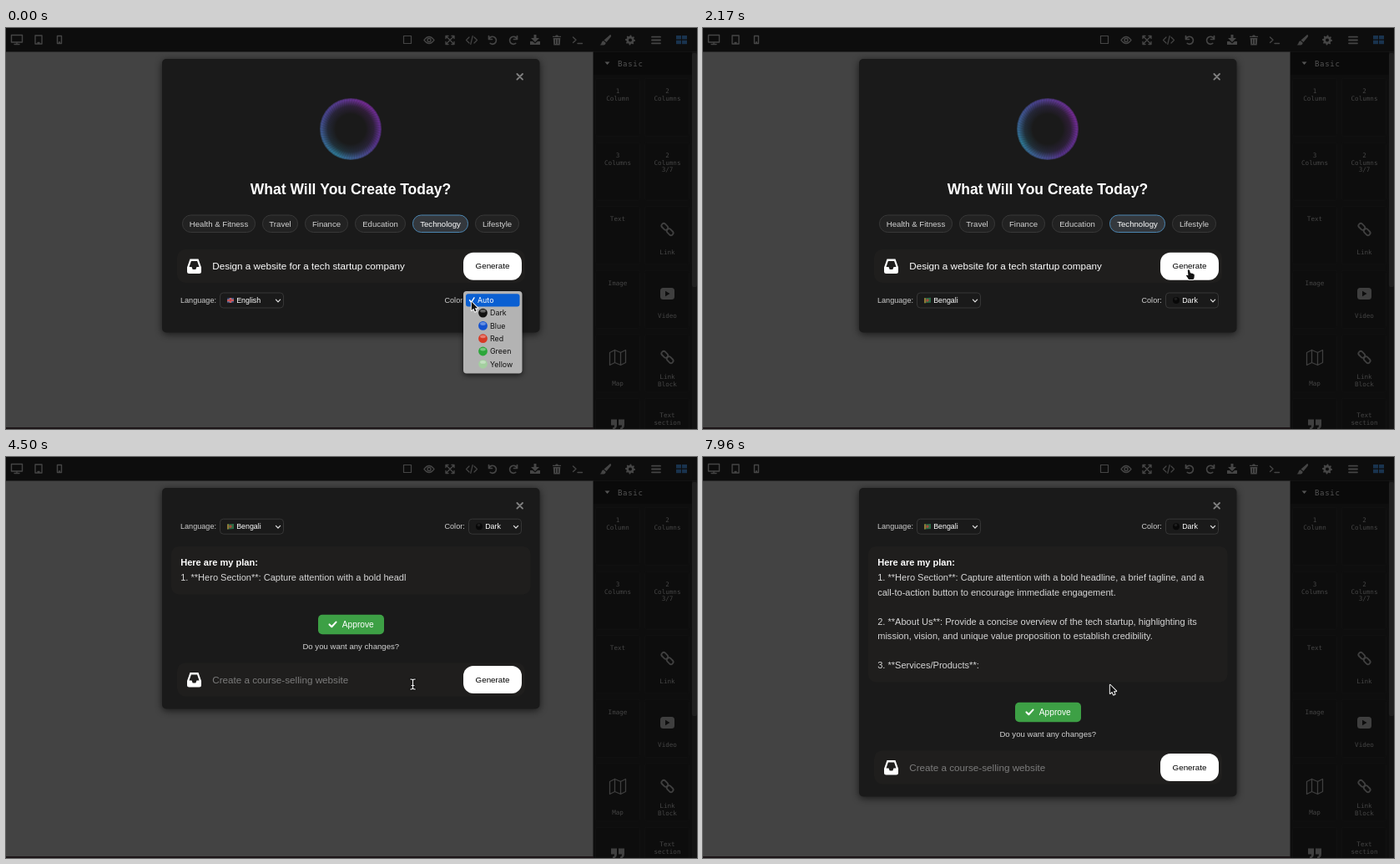
An HTML page with a canvas that plays this animation: 828 by 480 pixels, repeating every 8000 ms.

```html
<!DOCTYPE html>
<html lang="en">
<head>
<meta charset="utf-8">
<title>Website builder</title>
<style>
html, body { margin: 0; width: 100%; height: 100%; overflow: hidden; background: #434343; }
canvas { display: block; }
</style>
</head>
<body>
<canvas id="stage" width="828" height="480"></canvas>
<script>
const ctx = document.getElementById('stage').getContext('2d');
const SANS = '"Liberation Sans", Arial, sans-serif';
const MONO = '"DejaVu Sans Mono", monospace';
const MENU = 'Inter, sans-serif';
const LOOP = 8000;
const MODAL = '#1a1a1a';

const COLOR_PICKED = 450, LANG_OPEN = 1060, LANG_PICKED = 1730, GENERATE = 2400, PLAN = 3770;

const PLAN_TEXT = [
  '1. **Hero Section**: Capture attention with a bold headline, a brief tagline, and a',
  'call-to-action button to encourage immediate engagement.',
  '',
  '2. **About Us**: Provide a concise overview of the tech startup, highlighting its',
  'mission, vision, and unique value proposition to establish credibility.',
  '',
  '3. **Services/Products**:'
].join('\n');

// [time, characters shown]
const TYPING = [[PLAN, 0], [5380, 123], [5835, 154], [6750, 228], [7960, 322]];
// [time, x, y] of the pointer tip
const POINTER = [
  [0, 557, 327], [150, 557, 327], [330, 566, 342], [480, 566, 342], [860, 310, 320],
  [1200, 310, 320], [1400, 306, 341], [1760, 306, 341], [2110, 582, 289],
  [2580, 582, 289], [3000, 487, 272], [8000, 487, 272]
];

function interpolate(keys, t, ease = u => u) {
  let i = 1;
  while (i < keys.length - 1 && keys[i][0] < t) i++;
  const [a, b] = [keys[i - 1], keys[i]];
  const u = ease(Math.min(1, Math.max(0, (t - a[0]) / (b[0] - a[0]))));
  return a.slice(1).map((v, k) => v + (b[k + 1] - v) * u);
}
const smooth = u => u * u * (3 - 2 * u);

// y is the middle of the capital letters
function text(str, x, y, size, color, { font = SANS, weight = 400, align = 'left', spacing = 0 } = {}) {
  ctx.font = `${weight} ${size}px ${font}`;
  ctx.letterSpacing = spacing + 'px';
  ctx.textAlign = align;
  ctx.fillStyle = color;
  ctx.fillText(str, x, y + size * 0.36);
}

function box(x, y, w, h, r, fill, border) {
  ctx.beginPath();
  ctx.roundRect(x, y, w, h, r);
  if (fill) { ctx.fillStyle = fill; ctx.fill(); }
  if (border) { ctx.strokeStyle = border; ctx.lineWidth = 1; ctx.stroke(); }
}

function circle(x, y, r, fill) {
  ctx.beginPath();
  ctx.arc(x, y, r, 0, 7);
  ctx.fillStyle = fill;
  ctx.fill();
}

function icon(d, x, y, { fill, stroke, width = 1.4 } = {}) {
  const path = new Path2D(d);
  ctx.save();
  ctx.translate(x, y);
  ctx.lineJoin = ctx.lineCap = 'round';
  if (stroke) { ctx.strokeStyle = stroke; ctx.lineWidth = width; ctx.stroke(path); }
  if (fill) { ctx.fillStyle = fill; ctx.fill(path, 'evenodd'); }
  ctx.restore();
}

function shadowed(blur, offset, draw) {
  ctx.save();
  ctx.shadowColor = 'rgba(0,0,0,.65)';
  ctx.shadowBlur = blur;
  ctx.shadowOffsetY = offset;
  draw();
  ctx.restore();
}

function toolbar() {
  const gray = '#454545', line = { stroke: gray }, solid = { fill: gray };
  ctx.fillStyle = '#0d0d0d';
  ctx.fillRect(0, 0, 828, 28.5);
  icon('M-6.5-5.5h13v8.5h-13zM-3 5.5h6M0 3v2', 13, 14, line);
  icon('M-4-5h8v10h-8zM-1 3.5h2', 39, 14, line);
  icon('M-2.5-4.5h5v9h-5zM-.5 3h1', 64, 14, line);
  icon('M-4.5-4.5h9v9h-9z', 481, 14, { stroke: gray, width: 1.2 });
  icon('M-6 0Q0-8 6 0Q0 8-6 0zM-2 0a2 2 0 1 0 4 0a2 2 0 1 0-4 0', 507, 14.5, line);
  icon('M-5-2v-3h3M2-5h3v3M5 2v3h-3M-2 5h-3v-3M-5-5l10 10M5-5l-10 10', 532, 14.5, line);
  icon('M-3-3.5l-3.5 3.5l3.5 3.5M3-3.5l3.5 3.5l-3.5 3.5M1.2-5l-2.4 10', 558, 14.5, { stroke: gray, width: 1.2 });
  const turn = 'M-4.5-5v4h4M-4.3-1.2A4.5 4.5 0 1 1-2.7 3.9';
  icon(turn, 583, 14.5, { stroke: gray, width: 1.7 });
  ctx.save();
  ctx.translate(608, 14.5);
  ctx.scale(-1, 1);
  icon(turn, 0, 0, { stroke: gray, width: 1.7 });
  ctx.restore();
  icon('M-1.5-6h3v4h3.5l-5 5l-5-5h3.5zM-6 2h3l3 2.5l3-2.5h3v4h-12z', 634, 14, solid);
  icon('M-5-4.8h3l1-1.2h2l1 1.2h3v1.4h-10zM-4.3-2.5h8.6l-.6 8.5h-7.4zM-2-1v5.5h.8v-5.5zM1.2-1v5.5h.8v-5.5z', 660, 14.5, solid);
  icon('M-5.5-3.5l3.5 3.2l-3.5 3.2M0 4h5.5', 685, 14.5, line);
  icon('M6-6.5Q8-6 6.5-3.5L1.5 2.5L-1.5 0zM-2 .8l2.7 2.4Q.5 7-6.5 5.8Q-4.5 5-4.3 3Q-4 1-2 .8z', 718, 14.5, solid);
  let gear = '';
  for (let i = 0; i < 32; i++) {
    const a = i * Math.PI / 16, r = i % 4 < 2 ? 6 : 4.5;
    gear += `${i ? 'L' : 'M'}${r * Math.cos(a)} ${r * Math.sin(a)}`;
  }
  icon(gear + 'zM-2 0a2 2 0 1 0 4 0a2 2 0 1 0-4 0', 748, 14.5, solid);
  icon('M-5-3.8h10M-5 0h10M-5 3.8h10', 779, 14.5, { stroke: gray, width: 1.8 });
  icon('M-6.5-5h6v4.5h-6zM.5-5h6v4.5h-6zM-6.5.8h6v4.5h-6zM.5.8h6v4.5h-6z', 809.5, 14, { fill: '#19334e' });
}

function sidePanel() {
  const gray = '#3f3f3f';
  const label = (lines, x, y) => lines.split('|').forEach((s, i) =>
    text(s, x, y + i * 8.8, 7.6, '#454545', { font: MONO, align: 'center' }));
  ctx.fillStyle = '#0e0e0e';
  ctx.fillRect(703.5, 28.5, 124.5, 451.5);
  ctx.fillStyle = '#0a0a0a';
  ctx.fillRect(704, 28.5, 118, 27.5);
  icon('M-3-1.5h6l-3 3.5z', 720.5, 42, { fill: '#545454' });
  text('Basic', 733, 42.5, 9, '#545454', { font: MONO, spacing: 0.7 });
  for (let row = 0; row < 6; row++) {
    box(706.5, 60.5 + row * 76.6, 53, 69, 2, '#0d0d0d', '#111');
    box(765.5, 60.5 + row * 76.6, 53, 69, 2, '#0d0d0d', '#111');
  }
  ctx.fillStyle = '#131313';
  ctx.fillRect(822, 28.5, 6, 451.5);
  box(822, 30, 6, 280, 2, '#202020');

  label('1|Column', 733, 75.5);
  label('2|Columns', 792.5, 75.5);
  label('3|Columns', 733, 152);
  label('2|Columns|3/7', 792.5, 152);
  label('Text', 733, 228.5);
  label('Link', 792.5, 268);
  label('Image', 733, 305);
  label('Video', 792.5, 344.5);
  label('Map', 733, 425.5);
  label('Link|Block', 792.5, 417);
  label('Text|section', 792.5, 463);

  for (const y of [241, 394]) {
    for (const s of [-3.2, 3.2]) {
      ctx.save();
      ctx.translate(792.5 + s, y + s);
      ctx.rotate(Math.PI / 4);
      ctx.lineWidth = 1.8;
      ctx.strokeStyle = gray;
      ctx.beginPath();
      ctx.roundRect(-4.3, -2.7, 8.6, 5.4, 2.6);
      ctx.stroke();
      ctx.restore();
    }
  }
  box(784, 311, 17, 14, 3.5, gray);
  icon('M-2-3.2l5.5 3.2l-5.5 3.2z', 792, 318, { fill: '#0d0d0d' });
  icon('M-9.5-6l6-3l7 3l6-3v15l-6 3l-7-3l-6 3zM-3.5-9v15M3.5-6v15', 733, 394.5, { stroke: gray, width: 1.3 });
  icon('M-8-6h7v7q0 5-5 5v-2q2 0 2-3h-4zM1-6h7v7q0 5-5 5v-2q2 0 2-3h-4z', 733, 474.5, { fill: gray });
}

function backdrop() {
  ctx.fillStyle = '#434343';
  ctx.fillRect(0, 0, 828, 480);
  toolbar();
  sidePanel();
  ctx.fillStyle = '#1c1517';
  ctx.fillRect(0, 478, 704, 2);
}

function modal(bottom) {
  shadowed(10, 2, () => box(187, 37, 452.5, bottom - 37, 5, MODAL));
  icon('M-3.3-3.3l6.6 6.6M3.3-3.3l-6.6 6.6', 615.7, 58.3, { stroke: '#808080', width: 1.9 });
}

function orb(t) {
  const x = 413, y = 121, r = 37;
  const sweep = ctx.createConicGradient(-Math.PI / 3 + t / 2000 * 2 * Math.PI, x, y);
  ['#7a2b9b', '#5a3492', '#2f7f9e', '#4a4795', '#7a2b9b'].forEach((c, i) => sweep.addColorStop(i / 4, c));
  circle(x, y, r, sweep);
  ctx.strokeStyle = 'rgba(26,26,26,.2)';
  ctx.lineWidth = 0.8;
  ctx.beginPath();
  for (let i = 0; i < 72; i++) {
    const a = i * Math.PI / 36;
    ctx.moveTo(x + 22 * Math.cos(a), y + 22 * Math.sin(a));
    ctx.lineTo(x + r * Math.cos(a + 0.15), y + r * Math.sin(a + 0.15));
  }
  ctx.stroke();
  const core = ctx.createRadialGradient(x, y, 18, x, y, r);
  core.addColorStop(0, MODAL);
  core.addColorStop(0.5, 'rgba(26,26,26,.75)');
  core.addColorStop(0.9, 'rgba(26,26,26,.05)');
  core.addColorStop(1, 'rgba(26,26,26,.5)');
  circle(x, y, r + 0.5, core);
}

function flag(language, x, y) {
  ctx.save();
  ctx.translate(x, y);
  ctx.transform(1, -0.08, 0, 1, 0, 0);
  const bar = (c, ...r) => { ctx.fillStyle = c; ctx.fillRect(...r); };
  if (language === 'English') {
    bar('#39446e', -4, -3, 8, 6);
    bar('#c9b9b9', -4, -1.2, 8, 2.4);
    bar('#c9b9b9', -1.2, -3, 2.4, 6);
    bar('#c23a42', -4, -0.7, 8, 1.4);
    bar('#c23a42', -0.7, -3, 1.4, 6);
  } else if (language === 'Bengali') {
    bar('#2c6b45', -4, -3, 8, 6);
    bar('#8d7a35', -4, -3, 2, 6);
    circle(0, 0, 1.7, '#a8483a');
  } else {
    const hues = { Hindi: 28, Spanish: 45, French: 225, German: 0 };
    bar(`hsl(${hues[language]} 70% 45%)`, -4, -3, 8, 2);
    bar('#ddd', -4, -1, 8, 2);
    bar(`hsl(${hues[language] + 100} 50% 35%)`, -4, 1, 8, 2);
  }
  ctx.restore();
}

function select(x, y, w, label, value, labelX, focused) {
  text(label, labelX, y - 0.3, 9.1, '#cfcfcf');
  box(x + 0.5, y - 9, w - 1, 18, 4, MODAL, focused ? '#4b87b4' : '#363636');
  const chevron = x + w - 7;
  icon('M-2.6-1.3l2.6 2.6l2.6-2.6', chevron, y + 0.5, { stroke: '#e0e0e0', width: 1.2 });
  text(value, x + 20.2, y - 0.3, 8.85, '#fff');
}

function selects(y, language, focused) {
  select(256, y, 77, 'Language:', language, 209, focused);
  flag(language, 269, y);
  select(554, y, 64, 'Color:', 'Dark', 525.5);
  circle(567, y, 4, '#080808');
  circle(566.5, y - 1.7, 1.8, '#1d1d1d');
}

function promptRow(y, value, color) {
  box(205, y - 20, 417, 40, 10, '#1f1e1d');
  icon('M-8.5 1.5L-5-8.5H5L8.5 1.5V6.5Q8.5 9 6 9H-6Q-8.5 9-8.5 6.5zM-6 1L-3.6-6H3.6L6 1H3L1.8 4H-1.8L-3 1z',
    225.5, y, { fill: '#fff' });
  text(value, 247.2, y, 11.7, color);
  box(548, y - 16.3, 70, 33, 12, '#fff');
  text('Generate', 583, y - 0.3, 9.8, '#000', { align: 'center' });
}

// Native-style popup with the first entry checked
function popup(x, items, tipY, mark, offset) {
  shadowed(6, 2, () => box(x, 315, 70.5, 98.5, 4, '#b3b3b3'));
  const hovered = Math.max(0, Math.min(items.length - 1, Math.floor((tipY - 318) / 15.3)));
  items.forEach((item, i) => {
    const y = 325.8 + i * 15.3;
    if (i === hovered) box(x + 3, y - 7.6, 64.5, 15.3, 3, '#0a5fd2');
    const color = i === hovered ? '#fff' : '#111';
    if (i === 0) icon('M-2.5 0l2 2.5l3.5-5.5', x + 10, y, { stroke: color, width: 1.4 });
    const marked = mark(i, x + 23.5, y);
    text(item, x + (marked ? 32 : offset), y, 8.9, color, { font: MENU });
  });
}

function ball(i, x, y) {
  if (!i) return false;
  const color = ['', '#111', '#1452cf', '#d63a26', '#2ca63a', '#a3cf9f'][i];
  circle(x, y, 5.4, color);
  ctx.beginPath();
  ctx.ellipse(x, y - 2.4, 3.4, 1.9, 0, 0, 7);
  ctx.fillStyle = 'rgba(255,255,255,.35)';
  ctx.fill();
  return true;
}

function startScreen(t, tip) {
  modal(364.5);
  orb(t);
  text('What Will You Create Today?', 413, 193, 17.5, '#fff', { weight: 700, align: 'center' });
  const chips = [['Health & Fitness', 211, 299], ['Travel', 307, 350], ['Finance', 358, 410],
    ['Education', 418, 479], ['Technology', 487, 554], ['Lifestyle', 562, 615]];
  for (const [name, left, right] of chips) {
    const active = name === 'Technology';
    box(left + 0.5, 224, right - left - 1, 20.5, 10, active ? '#34383d' : '#222', active ? '#4c86b2' : '#383838');
    text(name, (left + right) / 2, 234.3, 9.6, active ? '#fff' : '#d2d2d2', { align: 'center' });
  }
  promptRow(285, 'Design a website for a tech startup company', '#fff');
  selects(326, t < LANG_PICKED ? 'English' : 'Bengali', t > 830 && t < LANG_PICKED);
  if (t < COLOR_PICKED) popup(548, ['Auto', 'Dark', 'Blue', 'Red', 'Green', 'Yellow'], tip[1], ball, 17);
  if (t >= LANG_OPEN && t < LANG_PICKED) {
    const languages = ['English', 'Bengali', 'Hindi', 'Spanish', 'French', 'German'];
    popup(250, languages, tip[1], (i, x, y) => { flag(languages[i], x - 1, y); return true; });
  }
}

function thinkingScreen(t) {
  modal(204.5);
  for (let i = 0; i < 3; i++) {
    const phase = (t - 3710) / 600 * 2 * Math.PI + [0.4, 1.4, -0.9][i];
    const height = 19 + 6 * Math.sin(phase);
    const w = i === 1 ? 2.6 : 2.2;
    ctx.globalAlpha = 0.75 + 0.25 * Math.cos(phase + 0.4);
    box(407.2 + i * 6 - w / 2, 104.7 - height / 2, w, height, 1, '#fff');
    ctx.globalAlpha = 1;
  }
  text('Thinking', 413, 139, 13.7, '#fff', { font: MONO, weight: 700, align: 'center' });
}

function planScreen(lines) {
  const shift = 17.5 * (lines.length - 2);
  modal(319 + shift);
  selects(83.2, 'Bengali');
  box(198, 107, 430.5, 75 + shift, 9, '#1f1e1d');
  text('Here are my plan:', 209.2, 126.5, 11.06, '#fff', { weight: 700 });
  lines.forEach((line, i) => text(line, 209.2, 144.1 + 17.5 * i, 11.06, '#d6d6d6'));
  box(374, 206.2 + shift, 79, 23.5, 5, '#3da045');
  icon('M-4 .2l2.8 2.8l5.2-5.6', 391.5, 217.7 + shift, { stroke: '#fff', width: 2.1 });
  text('Approve', 402.8, 217.5 + shift, 10.2, '#fff');
  text('Do you want any changes?', 413.3, 243.7 + shift, 9.6, '#d2d2d2', { align: 'center' });
  promptRow(283.9 + shift, 'Create a course-selling website', '#7b7b7b');
}

function pointer(kind, [x, y]) {
  if (kind === 'beam') {
    const beam = 'M-2.8-6q2.8 0 2.8 1.5v9q0 1.5-2.8 1.5M2.8-6q-2.8 0-2.8 1.5v9q0 1.5 2.8 1.5M-1.5 1.5h3';
    icon(beam, x + 0.5, y, { stroke: '#080808', width: 2.8 });
    icon(beam, x + 0.5, y, { stroke: '#f0f0f0', width: 1.2 });
  } else if (kind === 'hand') {
    icon('M-1.2 1Q0-.6 1 1L2 4.5Q3.2 3.8 3.8 5Q5 4.4 5.4 5.6Q6.8 5.3 6.8 7Q7 10 5.5 12H0Q-1.5 9.5-3 7.5Q-2.8 6-.6 7.2Z',
      x, y, { stroke: '#fff', width: 1.8, fill: '#111' });
  } else {
    icon('M.8.8V11l2.4-2.2l1.7 3.8l1.7-.8l-1.7-3.6h3.3z', x, y, { stroke: '#fff', width: 1.9, fill: '#111' });
  }
}

function render(t) {
  const tip = interpolate(POINTER, t, smooth);
  let kind = 'arrow';
  backdrop();
  if (t < GENERATE) {
    startScreen(t, tip);
    const onSelect = t > 800 && t < LANG_OPEN;
    const onButton = t > LANG_PICKED && tip[0] > 548;
    if (onSelect || onButton) kind = 'hand';
  } else if (t < PLAN) {
    thinkingScreen(t);
  } else {
    const shown = PLAN_TEXT.slice(0, Math.round(interpolate(TYPING, t)[0])).trimEnd();
    const lines = shown.split('\n');
    planScreen(lines);
    if (lines.length <= 2) kind = 'beam';
  }
  pointer(kind, tip);
}

function frame() {
  render(performance.now() % LOOP);
  requestAnimationFrame(frame);
}
frame();
</script>
</body>
</html>
```
